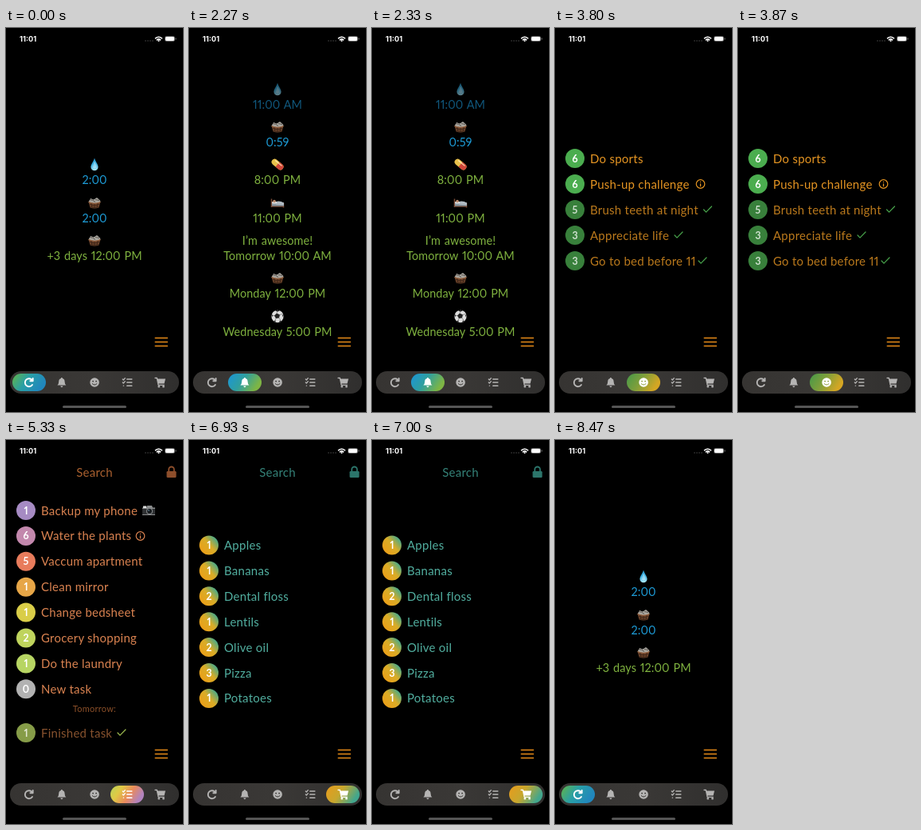
Animation, 222 px wide and 480 px high, one loop 8.54 s. Source, as an HTML page:

```html
<!DOCTYPE html>
<html lang="en">
<head>
<meta charset="utf-8">
<style>
  html, body { margin: 0; width: 100%; height: 100%; overflow: hidden; background: #000; }
  svg { display: block; width: 222px; height: 480px; }
  text { font-family: Lato, sans-serif; font-size: 15px; letter-spacing: .25px; font-variant-numeric: proportional-nums; }
  .mid { text-anchor: middle; }
  .time { font-size: 14.4px; letter-spacing: .1px; word-spacing: 1px; }
  .count { font-size: 12.5px; font-weight: 700; letter-spacing: 0; }
  .small { font-size: 11px; }
  .clock { font: 700 9.2px Inter, sans-serif; letter-spacing: 0; }
  .line { fill: none; stroke-linecap: round; stroke-linejoin: round; }
</style>
</head>
<body>
<svg id="stage" viewBox="0 0 222 480"></svg>
<script>
const LOOP = 8540;
const STARTS = [0, 2270, 3800, 5200, 6930, 8470];
const BLUE = '#1d9bd6', GREEN = '#7fb23f', HABIT = '#e49422', TASK = '#d98250', SHOP = '#51ae9f';

const at = (x, y, body, extra = '') => `<g transform="translate(${x} ${y})" ${extra}>${body}</g>`;
const text = (x, y, s, fill, cls = '') => `<text x="${x}" y="${y}" fill="${fill}" class="${cls}">${s}</text>`;
const line = (d, color, width = 1.5) => `<path class="line" d="${d}" stroke="${color}" stroke-width="${width}"/>`;
const gradient = (id, colors, dir = 'x2="1" y2=".35"') => `<linearGradient id="${id}" ${dir}>` +
  colors.map((c, i) => `<stop offset="${i / (colors.length - 1)}" stop-color="${c}"/>`).join('') + '</linearGradient>';

const defs = '<defs>' +
  gradient('pill0', ['#62b548', '#299fa6', '#2187bd']) +
  gradient('pill1', ['#1a95d8', '#2f9fa0', '#7eb544']) +
  gradient('pill2', ['#459849', '#7f9f3b', '#d5a623']) +
  gradient('pill3', ['#b8d35b', '#e0c945', '#e98a5c', '#b283bd']) +
  gradient('pill4', ['#e89b1c', '#c7a72e', '#42a68d']) +
  gradient('shop', ['#eba019', '#d9ac27', '#38a993'], 'x1=".1" y1=".8" x2=".9" y2=".1"') +
  gradient('water', ['#2a8fc4', '#35aee0', '#a5e6fb'], 'x2=".1" y2="1"') +
  gradient('bar', ['#363432', '#3a3836', '#302f2e'], 'x2="1" y2="0"') + '</defs>';

// Pictograms, each centred on 0,0
const pics = {
  drop: `<path d="M0-8C1-4 4.6 0 4.6 3.2A4.6 4.6 0 0 1-4.6 3.2C-4.6 0-1-4 0-8Z" fill="url(#water)"/>
    <path d="M0-4Q3 1 2 4Q0 6-2 4Q-2 1 0-4Z" fill="#d5f4ff" opacity=".5"/>`,
  basket: `<path d="M-7.5-1L-5.5 6Q0 8 5.5 6L7.5-1Z" fill="#6f452c"/>
    <path d="M-6.5 2Q0 5 6.5 2M-5.5 5Q0 7 5.5 5M-4 0L-3 6M0 1V7M4 0L3 6" fill="none" stroke="#3c2417" stroke-width=".9"/>
    <path d="M-7-2L-5-5.5L-1-4L3-6.5L7-3L7.5-1Q2 2-7.5-1Z" fill="#a9a7a0"/>
    <path d="M-6-4Q-2-4 1-1M1-4L6-3" fill="none" stroke="#5c5550"/>
    <path d="M-7.5-1Q0 2.5 7.5-1" fill="none" stroke="#9a6541" stroke-width="1.2"/>`,
  capsule: `<g transform="rotate(40)"><rect x="-8.5" y="-3.8" width="17" height="7.6" rx="3.8" fill="#e9c14b"/>
    <path d="M0-3.8H4.7A3.8 3.8 0 0 1 4.7 3.8H0Z" fill="#d0453a"/>
    <path d="M-5-2H5" stroke="#ffe9b5" stroke-linecap="round"/></g>`,
  bed: `<path d="M-7.5-5V5.5M7.5 0V6M-7.5 4.5H8" stroke="#7a4a35" stroke-width="1.5"/>
    <path d="M-7 0H8V4H-7Z" fill="#8d9aa4"/><path d="M-2 2V-1.5Q3-3 8 0V3Z" fill="#b0bac2"/>
    <rect x="-7" y="-1.5" width="6" height="2.5" rx="1" fill="#ddd"/><circle cx="-4" cy="-2" r="1.8" fill="#b98a6c"/>`,
  ball: `<circle r="7.7" fill="#ddd"/><path d="M-1-4L3-2L2 2L-2 2.5L-4-1Z" fill="#222"/>
    <path d="M-1-4L0-7M3-2L6-3M2 2L4 5M-2 2.5L-3 6M-4-1L-7-1" stroke="#777" stroke-width=".8"/>
    <path d="M-3-7L0-6L3-7Q0-8.5-3-7M7-3L6-1L7.5 2M-7-3L-6-1L-7.5 2M5 6L3 5L2 7.5M-5 6L-3 5L-2 7.5" fill="#222"/>`,
  camera: `<path d="M-8-3.5H-3L-2-6H4L5-3.5H8V6H-8Z" fill="#8a8c8d"/><path d="M-8-2H8V5H-8Z" fill="#303234"/>
    <rect x="-7" y="-5.5" width="4" height="2.5" fill="#ddd"/><circle cx="1" cy="1" r="4" fill="#85888a"/>
    <circle cx="1" cy="1" r="3" fill="#15191c"/><circle r="1" fill="#526b7a"/>`
};

const check = (x, y, color) => at(x, y, line('M-5 0L-2 3.2L5-4', color, 1.2));
const info = (x, y, color) => at(x, y, `<circle r="5.3" fill="none" stroke="${color}" stroke-width="1.2"/>` +
  line('M0 0V2.7M0-2.5V-2.4', color, 1.3));
const lock = color => at(207.5, 40, `<rect x="-6" y="-1" width="12" height="8" rx="1.3" fill="${color}"/>` +
  line('M-3.3-1V-3.2A3.3 3.3 0 0 1 3.3-3.2V-1', color, 1.8));

const navIcons = [
  c => line('M4-3A5 5 0 1 0 4.3 3M5-5V-1.8H1.7', c, 1.9),
  c => `<path d="M-5.5 3.5Q-3.7 2-3.7-1Q-3.7-4.5-.8-5V-6H.8V-5Q3.7-4.5 3.7-1Q3.7 2 5.5 3.5ZM-1.7 4.5H1.7Q1 6.3 0 6.3Q-1 6.3-1.7 4.5" fill="${c}"/>`,
  (c, bg) => `<circle r="5.8" fill="${c}"/><circle cx="-2" cy="-1.4" r=".9" fill="${bg}"/>
    <circle cx="2" cy="-1.4" r=".9" fill="${bg}"/>` + line('M-2.8 1.7Q0 4.5 2.8 1.7', bg, 1),
  c => line('M-6-4L-5-3L-3-5.2M-6 0L-5 1L-3-1.2M-5 4.2H-4.8', c, 1.3) + line('M-.5-4H5.5M-.5 0H5.5M-.5 4.2H5.5', c, 1.6),
  c => `<path d="M-4-4.5H6.5L5 1.5H-2.8Z" fill="${c}"/>` + line('M-6.5-5.5H-4.2L-2.4 3.3H4.8', c, 1.3) +
    `<circle cx="-1.7" cy="5.2" r="1.3" fill="${c}"/><circle cx="4" cy="5.2" r="1.3" fill="${c}"/>`
];

const nav = active => `<rect x="5" y="429" width="212" height="28" rx="14" fill="url(#bar)"/>
  <rect x="${8 + active * 41}" y="432" width="42" height="22" rx="11" fill="url(#pill${active})"/>` +
  navIcons.map((icon, i) => at(28.7 + i * 41.2, 443,
    icon(i === active ? '#fff' : '#b5b4b3', i === active ? '#8b9d3c' : '#363432'))).join('');

// Alarm rows: label, label centre, colour, pictogram, opacity
const alarms = rows => rows.map(([label, y, color, pic, opacity = 1]) =>
  (pic ? at(111, y - 18.5, pics[pic], `opacity="${opacity}"`) : '') +
  text(111, y + 5.5, label, color, 'mid time')).join('');

const item = (y, count, label, color, badge, dim) =>
  `<circle cx="25" cy="${y}" r="12" fill="${badge}"/>` +
  text(25, y + 4.5, count, dim ? '#ffffffbf' : '#fff', 'mid count') +
  text(44, y + 5.5, label, dim ? color + 'd0' : color);

const list = (top, rows, color, badge) => rows.map(([count, label], i) =>
  item(top + i * 31.9, count, label, color, badge(i))).join('');

const search = (color, lockColor) => text(111, 45.5, 'Search', color, 'mid') + lock(lockColor);

const taskColors = ['#a68bc3', '#c388ad', '#e87c5c', '#e7a647', '#d9cd48', '#bfd45d', '#b7d563', '#b2b2b2'];

const screens = [
  alarms([['2:00', 189, BLUE, 'drop'], ['2:00', 237, BLUE, 'basket'], ['+3 days 12:00 PM', 284, GREEN, 'basket']]),

  alarms([['11:00 AM', 95, '#10577c', 'drop', .55], ['0:59', 142, BLUE, 'basket'],
    ['8:00 PM', 189, GREEN, 'capsule'], ['11:00 PM', 237, GREEN, 'bed'],
    ['I’m awesome!', 265, GREEN], ['Tomorrow 10:00 AM', 284, GREEN],
    ['Monday 12:00 PM', 331, GREEN, 'basket'], ['Wednesday 5:00 PM', 379, GREEN, 'ball']]),

  [[6, 'Do sports'], [6, 'Push-up challenge'], [5, 'Brush teeth at night'], [3, 'Appreciate life'], [3, 'Go to bed before 11']]
    .map(([n, label], i) => item(163 + i * 32, n, label, HABIT, i < 2 ? '#4bad4f' : '#38803b', i > 1)).join('') +
    info(182.5, 195, HABIT) + check(191.5, 227, '#48a34b') + check(155, 259, '#48a34b') + check(185, 291, '#48a34b'),

  search('#a9602f', '#8d4e2b') +
    list(88, [[1, 'Backup my phone'], [6, 'Water the plants'], [5, 'Vaccum apartment'], [1, 'Clean mirror'],
      [1, 'Change bedsheet'], [2, 'Grocery shopping'], [1, 'Do the laundry'], [0, 'New task']], TASK, i => taskColors[i]) +
    at(179, 88, pics.camera) + info(168.5, 120, TASK) +
    text(111, 340, 'Tomorrow:', '#8c5029', 'mid small') +
    item(366, 1, 'Finished task', '#a66439', '#869c48', true) + check(145, 366, '#9fbd50'),

  search('#348278', '#2c756b') +
    list(131.5, [[1, 'Apples'], [1, 'Bananas'], [2, 'Dental floss'], [1, 'Lentils'], [2, 'Olive oil'], [3, 'Pizza'], [1, 'Potatoes']],
      SHOP, () => 'url(#shop)')
];

const chrome = text(17, 17, '11:01', '#fff', 'clock') +
  [175, 178, 181, 184].map(x => `<circle cx="${x}" cy="16" r=".7" fill="#555"/>`).join('') +
  at(191.5, 16, line('M-4-3.2Q0-6.3 4-3.2M-2.2-1.2Q0-3 2.2-1.2', '#fff', 1.6) + '<circle r="1.1" fill="#fff"/>') +
  `<rect x="199.5" y="10.5" width="12" height="6" rx="1.8" fill="none" stroke="#777" stroke-width=".8"/>
   <rect x="200" y="11" width="11" height="5" rx="1.3" fill="#fff"/><path d="M213 12.5V14.5" stroke="#777"/>` +
  line('M187.3 387.5H202.3M187.3 392.5H202.3M187.3 397.5H202.3', '#e58a18', 1.6) +
  '<rect x="71" y="472" width="80" height="3" rx="1.5" fill="#555"/>';

const stage = document.getElementById('stage');
stage.innerHTML = defs + '<rect width="222" height="480"/>' +
  screens.map((body, i) => `<g class="screen">${body}${nav(i)}</g>`).join('') + chrome;
const groups = stage.querySelectorAll('.screen');

function draw() {
  const t = performance.now() % LOOP;
  const current = STARTS.filter(start => start <= t).length - 1;
  groups.forEach((g, i) => g.style.display = i === current % screens.length ? '' : 'none');
  requestAnimationFrame(draw);
}
draw();
</script>
</body>
</html>
```
